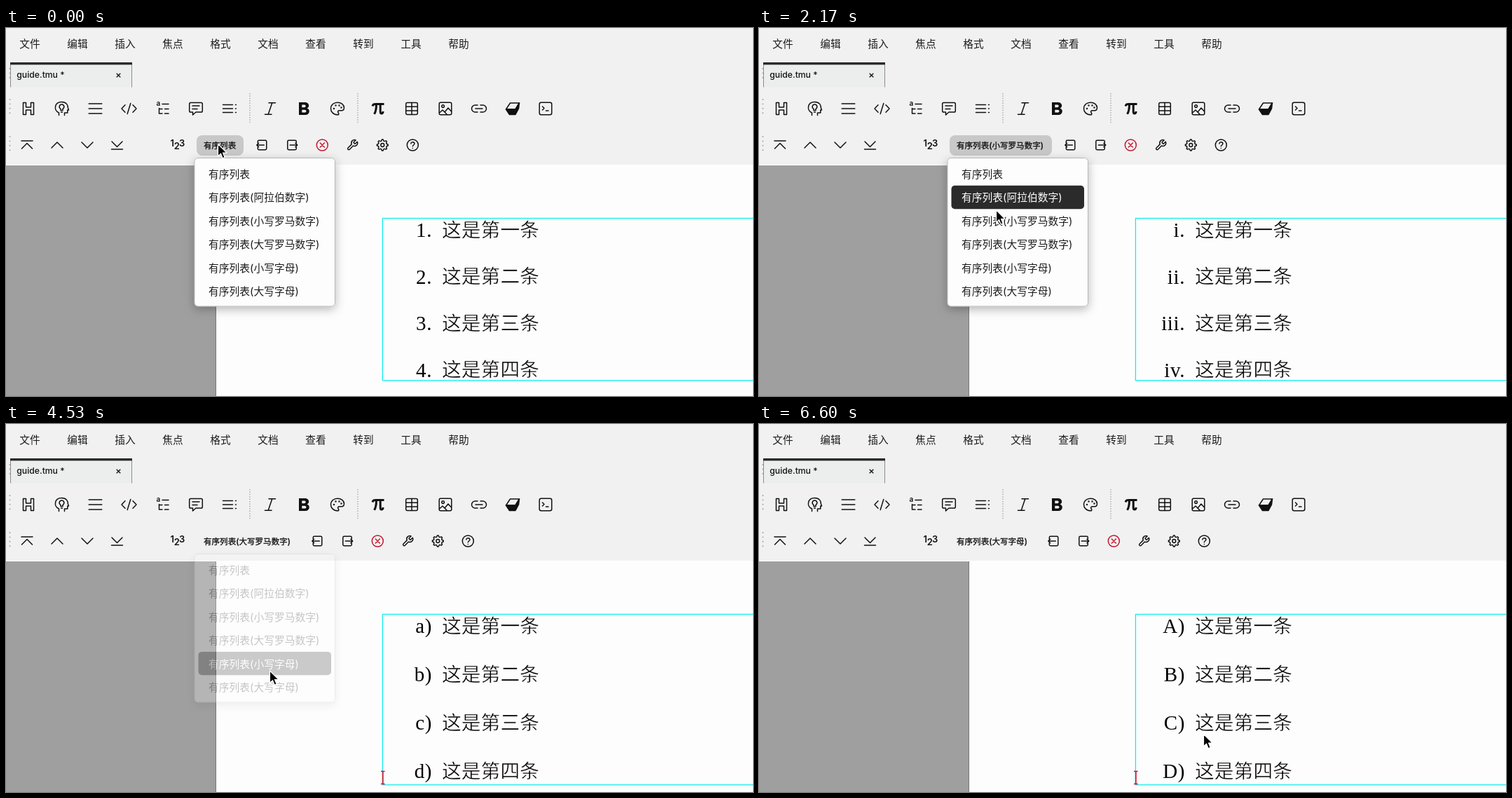
An HTML page for the animation above (6.63 s loop, 1066 px wide and 525 px high).

```html
<!DOCTYPE html>
<html lang="zh-CN">
<head>
<meta charset="utf-8">
<style>
html, body { margin: 0; width: 100%; height: 100%; overflow: hidden; background: #f1f1f1; }
svg { display: block; width: 1066px; height: 525px; }
text { font-family: Inter, "Noto Sans CJK SC", "Noto Sans CJK", sans-serif; fill: #111; white-space: pre; }
.bar text { font-size: 14.7px; fill: #1c1c1c; }
.icon { fill: none; stroke: #111; stroke-width: 1.5; stroke-linecap: round; stroke-linejoin: round; }
.icon .solid { fill: #111; }
.icon .red { stroke: #c4162f; }
.icon text { stroke: none; font-size: 10px; font-weight: 600; }
.digits { font-size: 13px; font-weight: 600; }
.items text { font-size: 14.75px; fill: #1c1c1c; }
#label { font-size: 11.55px; font-weight: 500; stroke: #111; stroke-width: .3; }
.list text { font-size: 27.8px; font-weight: 300; fill: #000; stroke: #fdfdfd; stroke-width: .5; }
.list .num { font-family: "Liberation Serif", serif; font-size: 29px; font-weight: 400; letter-spacing: .6px; text-anchor: end; stroke: none; }
</style>
</head>
<body>
<svg id="stage" viewBox="0 0 1066 525"></svg>
<script>
const LOOP = 6630;
const NAMES = ['有序列表', '有序列表(阿拉伯数字)', '有序列表(小写罗马数字)',
  '有序列表(大写罗马数字)', '有序列表(小写字母)', '有序列表(大写字母)'];
const ROW_TOP = 191.5, ROW_H = 33.35;

// Numbering styles: label index, button width, marks, line pitch, box bottom
const STYLES = [
  { name: 0, width: 67, marks: ['1.', '2.', '3.', '4.'], pitch: 66.4, bottom: 502.8 },
  { name: 2, width: 146, marks: ['i.', 'ii.', 'iii.', 'iv.'], pitch: 66.4, bottom: 502.8 },
  { name: 3, width: 146, marks: ['I.', 'II.', 'III.', 'IV.'], pitch: 66.4, bottom: 502.8 },
  { name: 4, width: 122, marks: ['a)', 'b)', 'c)', 'd)'], pitch: 69, bottom: 514.8 },
  { name: 5, width: 122, marks: ['A)', 'B)', 'C)', 'D)'], pitch: 69, bottom: 514.8 }
];

// Each round: button pressed, menu opened, item clicked
const ROUNDS = [
  { press: -100, open: -50, click: 970 },
  { press: 1630, open: 1680, click: 2700 },
  { press: 3310, open: 3375, click: 4370 },
  { press: 5000, open: 5075, click: 6130 }
];

const EASE = {
  lin: k => k,
  in: k => k * k,
  out: k => 1 - (1 - k) ** 2,
  both: k => k * k * (3 - 2 * k)
};

// Pointer stops: time, x, y, easing into the stop
const PATH = [
  [60, 302.5, 165.5], [600, 334, 267.5, 'both'],
  [1190, 334, 267.5], [1600, 325, 167, 'both'],
  [1830, 325, 167], [2170, 338.5, 259.5, 'in'], [2430, 345, 301, 'out'],
  [2900, 345, 301], [3230, 342, 199.5, 'in'], [3310, 336, 168, 'out'],
  [3500, 336, 168], [3980, 376.5, 352, 'both'],
  [4590, 376.5, 352], [4980, 336, 168, 'both'],
  [5370, 336, 168], [5470, 357, 298.5, 'lin'], [5800, 374, 373, 'out'],
  [6320, 374, 373], [6600, 634.5, 442.5, 'both']
];

function pointer(t) {
  const i = PATH.findIndex(p => p[0] > t);
  if (i < 0) return PATH[PATH.length - 1].slice(1, 3);
  if (i === 0) return PATH[0].slice(1, 3);
  const [t0, x0, y0] = PATH[i - 1], [t1, x1, y1, ease] = PATH[i];
  const k = EASE[ease || 'lin']((t - t0) / (t1 - t0));
  return [x0 + (x1 - x0) * k, y0 + (y1 - y0) * k];
}

const range = n => [...Array(n).keys()];
const path = (d, cls = '') => `<path class="${cls}" d="${d}"/>`;
const circle = (x, y, r, cls = '') => `<circle class="${cls}" cx="${x}" cy="${y}" r="${r}"/>`;
const box = (x, y, w, h, r, attrs = '') => `<rect x="${x}" y="${y}" width="${w}" height="${h}" rx="${r}" ${attrs}/>`;
const text = (x, y, s, attrs = '') => `<text x="${x}" y="${y}" ${attrs}>${s}</text>`;
const icon = (x, y, body) => `<g class="icon" transform="translate(${x} ${y})">${body}</g>`;
const grip = (y, n) => range(n).map(i => box(4.5, y + i * 6.4, 2, 2, 0.8, 'fill="#aaa"')).join('');
const divider = x => `<path d="M${x} 93V137" stroke="#888" stroke-dasharray="1.4 2"/>`;

const gear = 'M' + range(32).map(i => {
  const a = (i - 1.5) * Math.PI / 16, r = i % 4 === 1 || i % 4 === 2 ? 7.9 : 6.1;
  return (r * Math.cos(a)).toFixed(1) + ' ' + (r * Math.sin(a)).toFixed(1);
}).join('L') + 'Z';

const TOOLS = [
  [32, path('M-7.5-8.5h4v6.500h7v-6.500h4v17h-4v-6.500h-7v6.500h-4z')],
  [79.5, path('M-4 9.500V6C-12 2.500-10.500-9.500 0-9.500C7-9.500 9-4.500 8.800-1.500L10 2H8.300V6H4V9.500M-1.500 2.500V.5C-5-2-3-6 0-6S5-2 1.500 .5V2.500ZM-1 5h2')],
  [127.5, path('M-9.300-7H9.300M-9.300 0H9.300M-9.300 7H9.300')],
  [175.5, path('M-5.500-5.200L-10.500 0L-5.500 5.200M5.500-5.200L10.500 0L5.500 5.200M2.300-7.500L-2.300 7.500')],
  [223, text(-8.500, -4, 'a') + path('M0-6.500H9M-4.500-.5V7H0M-4.500 .5H0M3.500 .5H9M3.500 7H9')],
  [271, path('M-7.500-8.500H7.500q1.800 0 1.800 1.800V3.200q0 1.800-1.800 1.800H0L-4.500 9V5H-7.500q-1.800 0-1.800-1.800V-6.700q0-1.800 1.800-1.800zM-5-4H5M-5 .5H2')],
  [319, path('M-9.500-5.500H4.500M-9.500 0H4.500M-9.500 5.500H4.500M8.500-5.500h.9M8.500 0h.9M8.500 5.500h.9')],
  [377, path('M-2-8.300H7.500M-7.500 8.300H2M2.800-8.300L-2.800 8.300')],
  [425, `<path fill="#111" fill-rule="evenodd" stroke="none" d="M-7-9H1.500C8.500-9 8.500-1.500 4.500-.5C9.500.5 9 9 2 9H-7ZM-2.700-5.500V-1.800H.8C3.400-1.800 3.400-5.500.8-5.500ZM-2.700 1.700V5.500H1.200C4.200 5.500 4.200 1.700 1.200 1.700Z"/>`],
  [473, path('M1 8.800C-6 8.800-9.500 4.500-9.500 0C-9.500-5.500-5-8.800 0-8.800C5.500-8.800 9.500-5.500 9.500-1C9.500 3 6 3 4 2.800C0 2.500 0 4.500 1.300 6C2 7.200 2 8.800 1 8.800Z') +
    circle(-5, 0, .5) + circle(-2.500, -4.400, .5) + circle(2.500, -4.600, .5) + circle(5.500, -1.500, .5)],
  [531, `<path stroke-width="3" stroke-linecap="butt" d="M-8-3.500C-7-6.500-6-6.500-3-6.500H8.500M-2.500-6C-2.500 0-3 4-5.500 7.800M3.200-6V4C3.200 8 6.500 8 7.300 4"/>`],
  [579, box(-8.3, -8.5, 16.6, 17, 2) + path('M-8.300-2.800H8.300M-8.300 2.900H8.300M0-8.500V8.500')],
  [627, box(-8.8, -8.8, 17.6, 17.6, 2) + circle(-3.4, -3.4, 1.8) + path('M-8.500 6L-4 2L-1 5L4-1L8.500 4M-1 5L2 8')],
  [675, path('M-2-5H-5.500a5 5 0 0 0 0 10H-2M2-5H5.500a5 5 0 0 1 0 10H2M-5 0H5')],
  [723, path('M-3.500-8H9.500L4 1H-9.500Z') + path('M-9.500 1H4L9.500-8L8.500 0L4 8.500H-4.500Z', 'solid')],
  [770, box(-8.8, -8.8, 17.6, 17.6, 2.5) + path('M-4.500-3L-2-.5L-4.500 2M.5 3H4')]
];

const outdent = path('M-6-3V-5q0-1.700 1.700-1.700H4.800q1.700 0 1.700 1.700V5q0 1.700-1.700 1.700H-4.300Q-6 6.700-6 5V3M3 0H-7.500M-4.700-2.800L-7.500 0L-4.700 2.800');
const ACTIONS = [
  outdent,
  `<g transform="scale(-1 1)">${outdent}</g>`,
  circle(0, 0, 8, 'red') + path('M-3-3L3 3M3-3L-3 3', 'red'),
  `<g transform="scale(.74) translate(-12 -12)" stroke-width="2">${path('M14.700 6.300a1 1 0 0 0 0 1.400l1.600 1.600a1 1 0 0 0 1.400 0l3.770-3.770a6 6 0 0 1-7.940 7.940l-6.910 6.910a2.120 2.120 0 0 1-3-3l6.910-6.910a6 6 0 0 1 7.940-7.940z')}</g>`,
  path(gear) + circle(0, 0, 2.4),
  circle(0, 0, 8) + path('M-2.400-2C-2.400-5.200 2.600-5 2.600-2C2.600 0 0 0 0 1.800M0 4.400v.2')
];

const stage = document.getElementById('stage');
stage.innerHTML = `
  <defs><filter id="shade" x="-20%" y="-20%" width="140%" height="140%">
    <feDropShadow dx="0" dy="4" stdDeviation="7" flood-opacity=".28"/></filter></defs>
  <rect width="1066" height="525" fill="#f1f1f1"/>
  <rect y="195" width="1066" height="330" fill="#fdfdfd"/>
  <rect y="196" width="300" height="329" fill="#9f9f9f"/>
  <rect x="299" y="196" width="1" height="329" fill="#777"/>
  <g class="bar">${['文件', '编辑', '插入', '焦点', '格式', '文档', '查看', '转到', '工具', '帮助']
    .map((s, i) => text(19.3 + i * 68, 27.9, s)).join('')}</g>
  ${grip(57, 3)}${grip(101, 4)}${grip(154, 4)}
  <rect x="6" y="49" width="174" height="35.500" fill="#ebeeed"/>
  <path d="M6.500 50V84.500M179.500 50V84.500" stroke="#8c8c8c"/>
  <rect x="6" y="49" width="174" height="3.400" fill="#2a2a2a"/>
  ${text(15.3, 71.3, 'guide.tmu *', 'font-size="12.2" font-weight="500"')}
  <path d="M157.700 64.700l5.600 5.600m0-5.600l-5.600 5.600" stroke="#111" stroke-width="1.300"/>
  ${divider(348)}${divider(502)}
  ${TOOLS.map(([x, body]) => icon(x, 115, body)).join('')}
  ${icon(30, 167, path('M-8-6H8M-7.500 5L0-2.500L7.500 5'))}
  ${icon(73, 167, path('M-8 4L0-4L8 4'))}
  ${icon(116, 167, path('M-8-4L0 4L8-4'))}
  ${icon(158.5, 167, path('M-8 6H8M-7.500-5L0 2.500L7.500-5'))}
  <g class="digits">${text(234.5, 169, '1')}${text(239.8, 173, '2')}${text(247, 169, '3')}</g>
  <rect id="pill" x="272" y="153" height="29" rx="8" fill="#c8c8c8"/>
  <text id="label" x="282" y="172.400"></text>
  <g id="actions">${ACTIONS.map((body, i) => icon(365.3 + i * 43, 167, body)).join('')}</g>
  <rect id="focus" x="537.400" y="271.500" width="540" fill="none" stroke="#10eeee" stroke-width="1.300"/>
  <g class="list">${['一', '二', '三', '四'].map(s =>
    `<g class="line"><text class="num" x="608"></text>${text(622, -.7, `这是第${s}条`)}</g>`).join('')}</g>
  <path id="caret" d="M-2.800 0H2.800M0 0V18M-2.800 18H2.800" fill="none" stroke="#d0152f" stroke-width="1.700"/>
  <g id="menu">
    ${box(269, 185.5, 200.5, 211.5, 5, 'fill="#fdfdfd" stroke="#b9b9b9" filter="url(#shade)"')}
    <rect id="mark" x="274.500" width="189.500" height="33.400" rx="5" fill="#2b2b2b"/>
    <g class="items">${NAMES.map((s, i) => text(289, 214.1 + i * ROW_H, s)).join('')}</g>
  </g>
  <path id="arrow" d="M0 0V17.500L4 13.700L6.700 20.300L9.700 19L7 12.600H12.500Z" fill="#000" stroke="#fff" stroke-width="1.200" stroke-linejoin="round"/>`;

const get = id => document.getElementById(id);
const [pill, label, actions, focusBox, caret, menu, mark, arrow] =
  ['pill', 'label', 'actions', 'focus', 'caret', 'menu', 'mark', 'arrow'].map(get);
const lines = [...document.querySelectorAll('.line')];
const items = [...document.querySelectorAll('.items text')];
const set = (el, attrs) => { for (const k in attrs) el.setAttribute(k, attrs[k]); };
const show = (el, on) => set(el, { visibility: on ? 'visible' : 'hidden' });
const write = (el, s) => { if (el.textContent !== s) el.textContent = s; };
const clamp = v => Math.max(0, Math.min(1, v));

function draw(t) {
  const after = delay => STYLES[ROUNDS.filter(r => t >= r.click + delay).length];
  const list = after(120), tool = after(230);
  const round = ROUNDS.filter(r => t >= r.press).pop();
  const since = t - round.click;

  set(pill, { width: tool.width });
  show(pill, since < 80);
  write(label, NAMES[tool.name]);
  set(actions, { transform: `translate(${tool.width - 67} 0)` });

  set(focusBox, { height: list.bottom - 271.5 });
  lines.forEach((line, i) => {
    set(line, { transform: `translate(0 ${298.4 + i * list.pitch})` });
    write(line.firstChild, list.marks[i]);
  });
  set(caret, { transform: `translate(537.8 ${list.bottom - 19.3})` });
  show(caret, t < round.open || since >= 120);

  const fade = t < round.open ? 0 : 1 - clamp((since - 100) / 80);
  set(menu, { opacity: fade });
  show(menu, fade > 0);

  // The highlight trails the pointer and blinks once on a click
  const row = Math.floor((pointer(t - 20)[1] - ROW_TOP) / ROW_H);
  const lit = row >= 0 && row < NAMES.length && !(since >= 20 && since < 70);
  set(mark, { y: ROW_TOP + row * ROW_H, opacity: lit ? 1 : 0 });
  items.forEach((el, i) => { el.style.fill = lit && i === row ? '#fff' : ''; });

  set(arrow, { transform: `translate(${pointer(t).join(' ')})` });
}

const start = performance.now();
function tick() {
  draw((performance.now() - start) % LOOP);
  requestAnimationFrame(tick);
}
tick();
</script>
</body>
</html>
```
